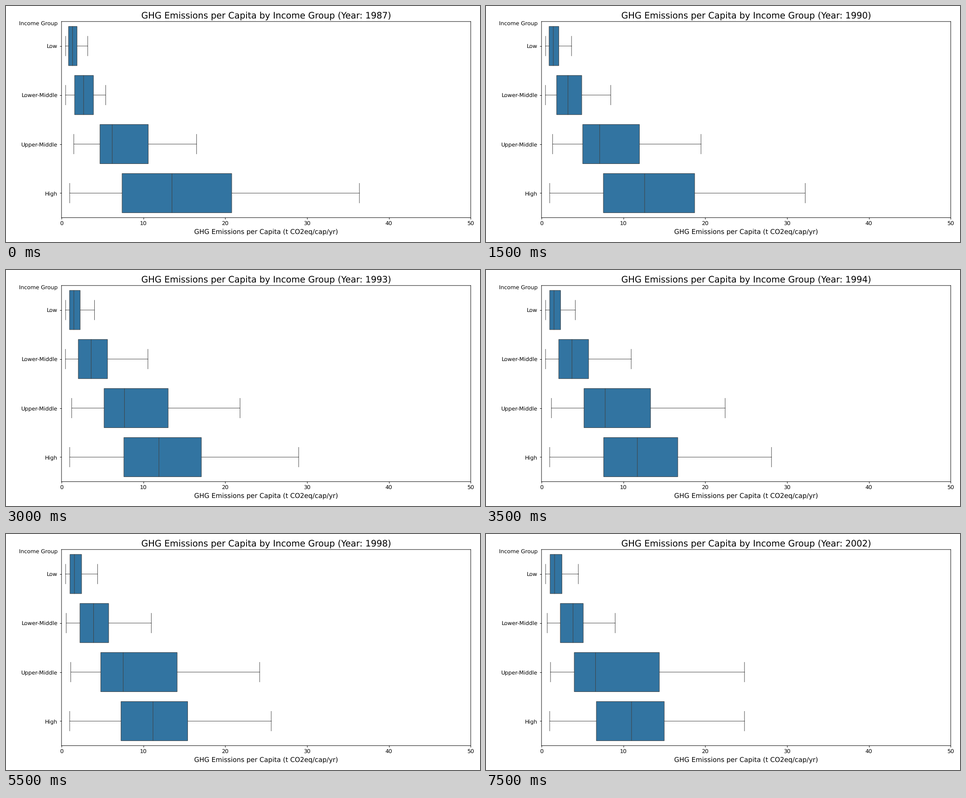
A matplotlib script for the animation above (8000 ms loop, 1058 by 529 pixels).

```python
import math

import numpy as np
import matplotlib.pyplot as plt
from matplotlib.animation import FuncAnimation
from matplotlib.patches import Rectangle

W, H = 1058, 529
LEFT, RIGHT, TOP, BOTTOM = 123.9, 1037.3, 34.8, 474.4
X_MAX = 50
FIRST_YEAR, N_YEARS = 1987, 16
BLUE, GRAY = "#3274a1", "#3f3f3f"


def drift(start, end, bulge=0):
    """Ease out from start to end, with an optional rise midway."""
    def at(t):
        eased = t * (2 - t)
        return start + (end - start) * eased + bulge * math.sin(math.pi * t)
    return at


# Lower whisker, first quartile, median, third quartile, upper whisker.
GROUPS = {
    "Low": [drift(0.5, 0.5), drift(0.86, 1.05), drift(1.35, 1.6),
            drift(1.9, 2.5), drift(3.2, 4.5)],
    "Lower-Middle": [drift(0.5, 0.7, -0.15), drift(1.6, 2.3), drift(2.7, 3.85, 0.2),
                     drift(3.9, 5.1, 1), drift(5.4, 9, 3)],
    "Upper-Middle": [drift(1.5, 1.1), drift(4.7, 4, 1), drift(6.2, 6.6, 1.3),
                     drift(10.6, 14.4), drift(16.5, 24.8)],
    "High": [drift(1, 1), drift(7.4, 6.7, 0.7), drift(13.5, 11),
             drift(20.8, 15), drift(36.4, 24.8)],
}

plt.rcParams.update({"font.family": "DejaVu Sans", "path.snap": False,
                     "text.hinting": "no_hinting"})
fig = plt.figure(figsize=(12, 6), dpi=H / 6, facecolor="white")
ax = fig.add_axes([LEFT / W, 1 - BOTTOM / H, (RIGHT - LEFT) / W, (BOTTOM - TOP) / H])
ax.set_xlim(0, X_MAX)
ax.set_ylim(len(GROUPS) - 0.5, -0.5)
ax.set_xticks(range(0, X_MAX + 1, 10))
ax.set_yticks(range(len(GROUPS)), list(GROUPS))
ax.set_xlabel("GHG Emissions per Capita (t CO2eq/cap/yr)", fontsize=12)
fig.text(114.8 / W, 1 - TOP / H, "Income Group", fontsize=10, ha="right", va="top")
title = ax.set_title("", fontsize=16)

boxes, lines = [], []
for row in range(len(GROUPS)):
    box = Rectangle((0, row - 0.4), 1, 0.8, fc=BLUE, ec=GRAY, lw=0.8, zorder=2)
    boxes.append(ax.add_patch(box))
    lines += ax.plot([], [], color=GRAY, lw=0.8, zorder=3)


def draw(i):
    title.set_text("GHG Emissions per Capita by Income Group "
                   f"(Year: {FIRST_YEAR + i})")
    t = i / (N_YEARS - 1)
    for row, stats in enumerate(GROUPS.values()):
        lo, q1, mid, q3, hi = (stat(t) for stat in stats)
        boxes[row].set_x(q1)
        boxes[row].set_width(q3 - q1)
        segments = [
            (lo, q1, 0), (q3, hi, 0),
            (lo, lo, 0.2), (hi, hi, 0.2), (mid, mid, 0.4),
        ]
        xs, ys = [], []
        for x0, x1, half in segments:
            xs += [x0, x1, np.nan]
            ys += [row - half, row + half, np.nan]
        lines[row].set_data(xs, ys)
    return [title, *boxes, *lines]


anim = FuncAnimation(fig, draw, frames=N_YEARS, interval=500,
                     init_func=lambda: draw(0), repeat=True, repeat_delay=0)
plt.show()
```
